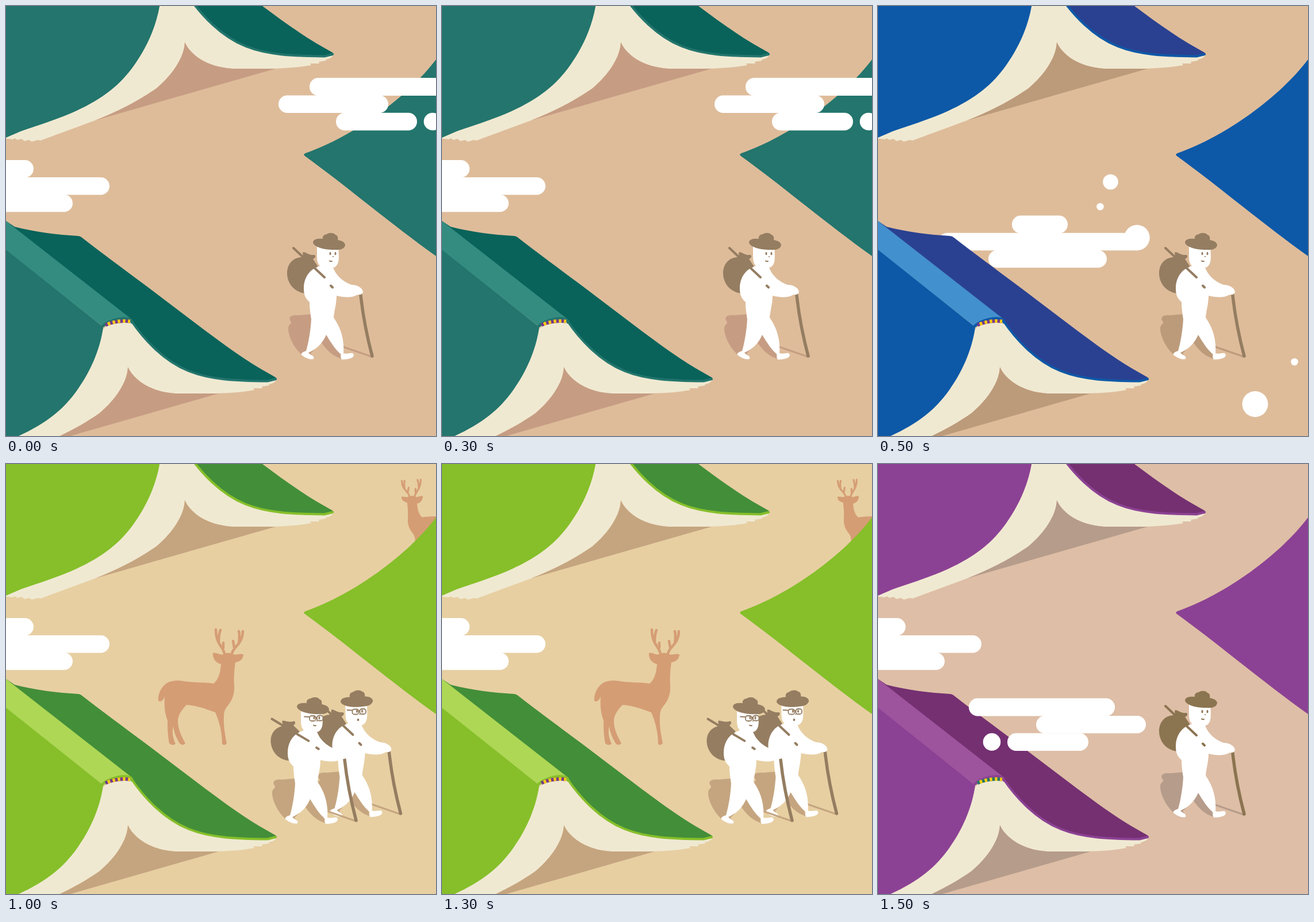
Animation, 748 px wide and 748 px high, one loop 2000 ms. Source, as an HTML page:

```html
<!DOCTYPE html>
<html lang="en">
<head>
<meta charset="utf-8">
<title>Walking among books</title>
<style>
  html, body { margin: 0; width: 100%; height: 100%; overflow: hidden; }
  svg { display: block; width: 100vw; height: 100vh; background: var(--ground); }
  .cover { fill: var(--cover); }
  .dark { fill: var(--dark); }
  .spine { fill: var(--spine); }
  .paper { fill: var(--paper); }
  .shade { fill: var(--shade); }
  .brown { fill: var(--brown); }
  .deer { fill: var(--deer); }
  .white { fill: #fff; }
  .line { fill: none; stroke-linecap: round; stroke-linejoin: round; }
  .line.cover { stroke: var(--cover); }
  .line.brown { stroke: var(--brown); }
  .line.shade { stroke: var(--shade); }
  .line.deer { stroke: var(--deer); }
</style>
</head>
<body>
<svg id="stage" viewBox="0 0 748 748">
  <defs>
    <g id="book">
      <path class="dark" d="M0 374L15 384C50 393 90 398 125 400Q128 400 131 402
        C168 431 204 457 240 484L347 565C378 588 408 610 441 630L469 646Q473 649 469 651
        L455 653C400 652 355 650 318 635C275 618 240 580 219 549L0 400Z"/>
      <path class="paper" d="M168 563C176 553 200 547 219 550C240 580 275 618 318 635
        C355 650 400 652 455 653L470 651Q466 657 457 658L458 660L445 662L446 665L430 665L432 668
        C410 672 390 673 365 674C340 674 320 675 295 674C250 671 222 650 212 628
        C211 655 190 685 163 708C130 731 95 749 56 764L-39 799L-44 798L-54 801L-59 798L-67 800L-72 796
        L-79 798L-84 795L-87 797L-110 794L22 735Z"/>
      <path class="shade" d="M212 628C211 655 190 685 163 708C130 731 95 749 56 764L370 674L295 674
        C250 671 222 650 212 628Z"/>
      <path class="cover" d="M-120 328L0 423L166 556L169 560C163 600 146 637 124 668
        C100 702 70 726 22 748C-5 760-35 770-65 780C-80 785-90 791-110 798Z"/>
      <path class="spine" d="M-120 280L0 374L220 546C204 538 180 544 166 556L0 424L-120 329Z"/>
      <path class="line cover" stroke-width="5" d="M168 557C180 546 204 541 215 545Q219 547 219 550"/>
      <path class="line cover" stroke-width="4" d="M219 549C240 580 275 618 318 635
        C355 650 400 652 455 652.500L469 649"/>
      <path class="line" stroke="var(--thread)" stroke-width="6" style="stroke-linecap:butt"
        d="M173 555C186 549 200 547 216 548.500"/>
      <path class="line" stroke="#f9cb12" stroke-width="6" stroke-dasharray="4.500 4.500"
        style="stroke-linecap:butt" d="M177 553.500C188 549 200 547 216 548.500"/>
    </g>

    <path id="bag" class="brown" d="M515 437C518 433 515 431 517 428C522 428 526 434 537 433
      C540 436 537 439 534 440L542 452L530 500C505 502 489 485 489 465C489 448 500 437 515 437Z"/>
    <path id="stick" class="line brown" stroke-width="4" d="M500 421L520 440M537 456L554 472M565 486.500L568 489.500"/>
    <g id="shadow">
      <path class="shade" d="M494 547C491 540 498 537 508 538L532 536L562 562L585 614
        C568 610 557 597 549 586L530 604L535 614C514 618 490 580 491 560C491 553 500 553 494 547Z"/>
      <path class="line shade" stroke-width="3" d="M587 593L636 610"/>
    </g>
    <g id="body">
      <path class="line brown" stroke-width="5.500" d="M617 503C621 540 628 575 637 609"/>
      <path class="white" d="M541 417H578C579 430 580 445 576 450Q573 455 569 455
        C574 469 587 480 601 485C612 485 621 491 621 498Q619 503 612 502
        C602 508 588 507 575 504C575 518 571 530 570 542C581 558 589 578 587 604
        C594 606 598 603 603 604Q607 607 603 611Q597 615 584 615Q581 611 583 606
        C573 598 565 585 557 572C550 588 540 597 526 603C530 608 537 608 535 614
        C528 616 521 612 514 607Q512 603 522 600C527 583 530 562 531 545
        C529 533 528 523 528 515C520 508 518 501 518 491C518 474 527 459 542 454
        L546 452C541 447 541 440 541 432Z"/>
    </g>
    <path id="hat" class="brown" d="M551 405C550 400 554 397 558 397C562 394 570 394 573 398
      C577 399 578 403 577 407C584 408 590 411 590 416C589 422 582 425 572 424
      C558 425 535 420 534 411C535 405 543 404 551 405Z"/>
    <g id="face" class="brown">
      <ellipse cx="564" cy="430.500" rx="1.500" ry="2.700"/>
      <ellipse cx="573" cy="430.500" rx="1.500" ry="2.700"/>
      <circle cx="569" cy="436" r="1.100"/>
    </g>
    <path id="smile" class="line brown" stroke-width="2" d="M563 443.500Q565 444.500 567 444"/>
    <g id="glasses" class="line brown" stroke-width="1.800">
      <path d="M547 428.500L556 429M567 430H569"/>
      <rect x="556" y="427" width="11" height="9" rx="3.500"/>
      <rect x="569" y="426.500" width="10.500" height="9" rx="3.500"/>
    </g>

    <g id="stag">
      <path class="deer" d="M276 404C274 411 269 415 265 412C264 404 267 394 274 386
        C281 378 292 376 304 377C325 381 345 379 361 382C369 376 373 364 374 348
        C364 346 359 337 360 329C366 327 372 333 378 331Q386 326 395 331
        C401 333 406 329 413 331C413 339 407 344 399 345
        C397 358 396 372 397 386C398 400 393 412 386 420Q379 428 379 438
        C378 455 381 470 384 486Q380 491 376 487C376 468 371 447 364 432
        C345 425 330 420 314 419C305 428 299 438 299 447C299 462 306 475 312 486
        Q307 491 302 486C296 475 292 467 291 456C288 468 291 478 295 487Q289 491 284 486
        C281 470 281 456 281 446C276 433 275 420 276 404Z"/>
      <path class="line deer" stroke-width="4.500" d="M380 330C378 318 365 313 365 288M370 309Q370 296 373 289
        M378 320L378 311M393 330C396 316 411 315 412 291M405 312Q407 299 405 291M397 319L395 308"/>
    </g>

    <g id="edgeCloud" class="white">
      <rect x="-40" y="268" width="88" height="30.500" rx="15.250"/>
      <rect x="-40" y="298" width="220" height="30.500" rx="15.250"/>
      <rect x="-40" y="328" width="156" height="30.300" rx="15.150"/>
    </g>
    <g id="drift" class="white">
      <rect x="528" y="125" width="254" height="31" rx="15.250"/>
      <rect x="474" y="155.500" width="191" height="30.500" rx="15.250"/>
      <rect x="574" y="185.700" width="141" height="30.800" rx="15.250"/>
      <circle cx="742" cy="201" r="15.300"/>
    </g>
  </defs>

  <use href="#stag" data-on="2" transform="translate(706 62) scale(-.7 .7) translate(-387 -338)"/>
  <path class="cover" d="M521 256C605 227 700 157 748 93V435C670 379 600 320 535 272L520 261Q516 258 521 256Z"/>
  <use href="#edgeCloud" data-on="0 2 3"/>
  <use href="#stag" data-on="2"/>
  <g class="white" data-on="1">
    <rect x="233" y="364.500" width="97" height="31" rx="15.250"/>
    <rect x="105" y="394.700" width="360" height="30.600" rx="15.250"/>
    <rect x="192" y="424.700" width="206" height="30.500" rx="15.250"/>
    <circle cx="450.500" cy="403" r="22.200"/>
    <circle cx="404.500" cy="306" r="13.300"/>
    <circle cx="386.500" cy="349" r="6.300"/>
    <circle cx="724.500" cy="619" r="6.300"/>
    <circle cx="656" cy="692.500" r="22.500"/>
  </g>
  <use href="#book"/>
  <use href="#book" transform="translate(99 -565)"/>
  <use href="#drift" data-on="0"/>
  <use href="#drift" data-on="3" transform="translate(940 282.500) scale(-1 1)"/>

  <g data-on="0 1 3">
    <use href="#shadow"/><use href="#bag"/><use href="#body"/><use href="#stick"/>
    <use href="#hat"/><use href="#face"/><use href="#smile"/>
  </g>
  <g data-on="2">
    <g transform="translate(49.500 -1)">
      <use href="#shadow"/><use href="#bag"/><use href="#body"/><use href="#stick"/>
      <use href="#hat" transform="translate(-1.500 0) rotate(-7 562 413)"/>
      <g transform="translate(-3 .5)"><use href="#face"/><use href="#glasses"/></g>
      <ellipse class="brown" cx="563" cy="446" rx="1.800" ry="2.200"/>
    </g>
    <g transform="translate(-28 11)">
      <use href="#shadow"/>
      <use href="#bag" transform="translate(-3 3.500) rotate(-12.500 533.500 454.500)"/>
      <use href="#body"/>
      <use href="#stick" transform="translate(-3 3.500) rotate(-12.500 533.500 454.500)"/>
      <use href="#hat"/><use href="#face"/><use href="#glasses"/><use href="#smile"/>
    </g>
  </g>
</svg>
<script>
  const STEP = 500;
  const base = {
    ground: '#debc9a', paper: '#f0e9d2', brown: '#957d61', thread: '#743b8c', deer: '#d59d74'
  };
  const scenes = [
    { cover: '#23756d', dark: '#09635a', spine: '#348c80', shade: '#c69d83' },
    { cover: '#0d59a7', dark: '#2a4191', spine: '#4390ce', shade: '#bc9b7b' },
    { cover: '#86bf2a', dark: '#438e39', spine: '#aed755', shade: '#c5a580', ground: '#e7cfa2' },
    { cover: '#8c4294', dark: '#743071', spine: '#9e539d', shade: '#b69c8b', ground: '#debea6',
      brown: '#8b7450', thread: '#257668' }
  ];
  const stage = document.getElementById('stage');
  const parts = [...stage.querySelectorAll('[data-on]')];
  let current = -1;

  function show(i) {
    if (i === current) return;
    current = i;
    for (const [name, color] of Object.entries({ ...base, ...scenes[i] })) {
      stage.style.setProperty('--' + name, color);
    }
    for (const part of parts) {
      part.style.display = part.dataset.on.split(' ').includes(String(i)) ? '' : 'none';
    }
  }

  const start = performance.now();
  function tick() {
    show(Math.floor((performance.now() - start) / STEP) % scenes.length);
    requestAnimationFrame(tick);
  }
  tick();
</script>
</body>
</html>
```
